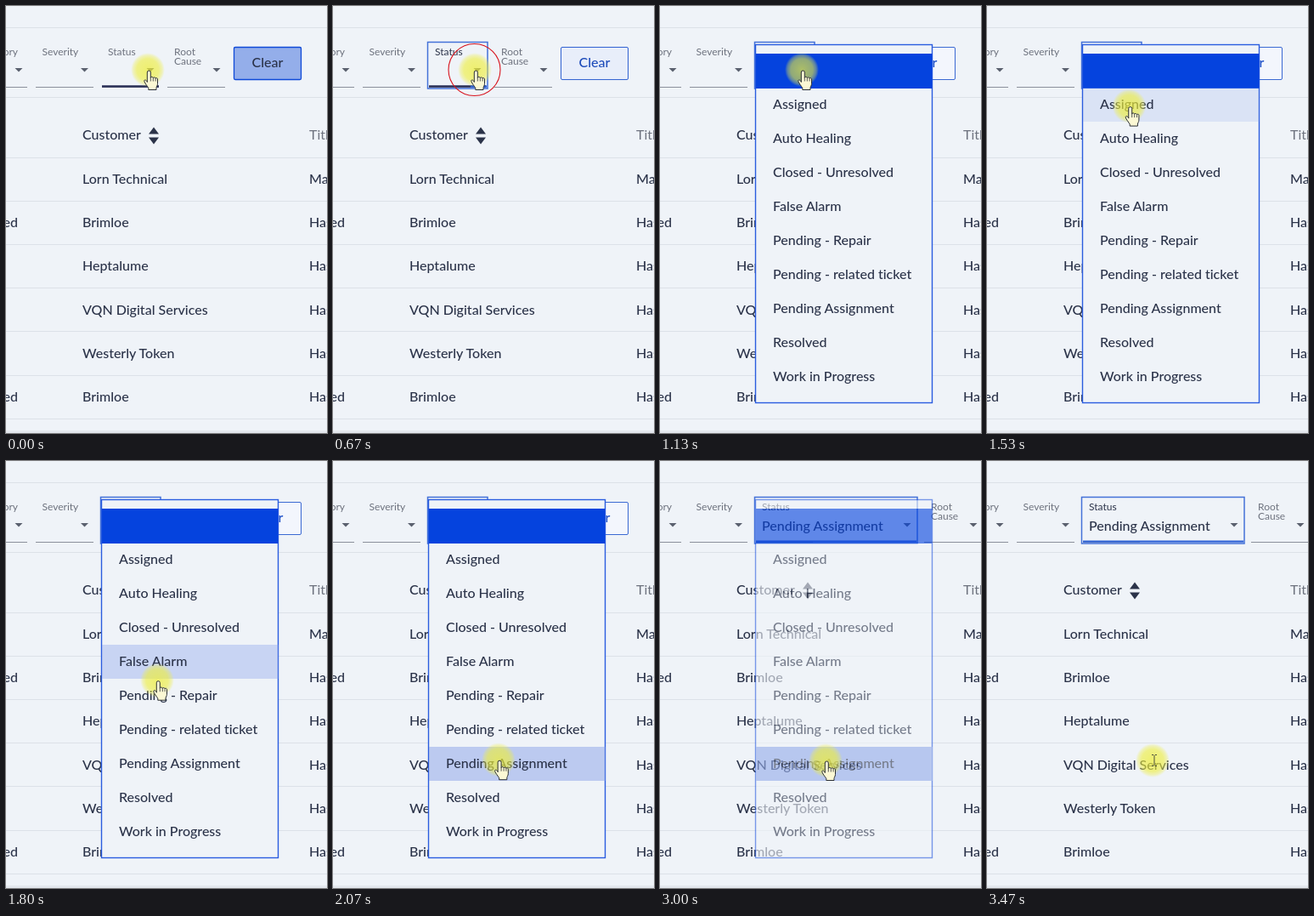
An HTML page for the animation above (3.99 s loop, 378x502 px).

```html
<!DOCTYPE html>
<html lang="en">
<head>
<meta charset="utf-8">
<title>Status filter</title>
<style>
  html, body { margin: 0; width: 100%; height: 100%; overflow: hidden; background: #eff3f8; }
  svg { display: block; width: 100%; height: 100%; }
  text {
    font: 500 16px Lato, "Open Sans", sans-serif; font-variant-ligatures: none;
    fill: #2b3349; white-space: pre;
  }
  .small { font-size: 12px; font-weight: 400; fill: #6d727e; }
  .rule { stroke: #dce1e8; }
  .under { stroke: #8b909b; }
  .arrow { fill: #5a606e; }
</style>
</head>
<body>
<svg viewBox="0 0 378 502">
  <defs>
    <radialGradient id="glow">
      <stop offset="0" stop-color="#eeee38" stop-opacity=".72"/>
      <stop offset=".65" stop-color="#eeee38" stop-opacity=".6"/>
      <stop offset=".85" stop-color="#eeee48" stop-opacity=".36"/>
      <stop offset="1" stop-color="#eeee50" stop-opacity="0"/>
    </radialGradient>
  </defs>
  <rect width="378" height="502" fill="#eff3f8"/>
  <rect y="499" width="378" height="3" fill="#e4e8ee"/>
  <g id="page"></g>

  <g id="status">
    <path class="under" d="M113 95.5H180"/>
    <rect id="focusBox" x="111.500" y="42.500" height="54.500" fill="none" stroke="#4472d8" stroke-width="1.500"/>
    <path id="hoverLine" d="M113 94.500H180" stroke="#2b3158" stroke-width="2.600"/>
    <path id="focusLine" stroke="#2f62d6" stroke-width="2.400"/>
    <text id="statusLabel" class="small" x="120" y="58">Status</text>
    <text id="value" x="120" y="82">Pending Assignment</text>
    <path id="statusArrow" class="arrow" d="M-4.5 -2h9l-4.5 4.5z"/>
  </g>

  <g id="cause">
    <text class="small" x="198" y="58">Root</text>
    <text class="small" x="198" y="69">Cause</text>
    <path class="arrow" d="M243.500 73h9l-4.500 4.500z"/>
    <path class="under" d="M190 95.500H258"/>
  </g>

  <g id="clear" text-anchor="middle">
    <rect x="268.500" y="48.500" width="79" height="38" rx="1.500" fill="#f3f6fd" stroke="#3a69d2"/>
    <text x="308" y="72" style="fill:#1c4fc8">Clear</text>
    <g id="clearFocus">
      <rect x="268.500" y="48.500" width="79" height="38" rx="1.500" fill="#94aeea" stroke="#0f4ad8" stroke-width="1.300"/>
      <text x="308" y="72">Clear</text>
    </g>
  </g>

  <g id="panel">
    <rect x="112.500" y="45.500" width="208" height="421" fill="#eff3f8" stroke="#2a5cdf" stroke-width="1.400"/>
    <rect x="113" y="56" width="207.500" height="41" fill="#0543de"/>
    <rect id="hover" x="113" width="207.500" height="40" fill="#95acea"/>
    <g id="options"></g>
  </g>

  <circle id="ring" fill="none" stroke="#d8141e" stroke-width="1.100"/>
  <g id="cursor">
    <circle r="20" fill="url(#glow)"/>
    <g id="hand" transform="translate(.8 1.500)" stroke="#2a2e34" stroke-linejoin="round">
      <path fill="#fbf8d4" d="M-1.500 13V1.500a2 2 0 0 1 4 0V8c0-1.600 3-1.600 3 .3 0-1.400 2.800-1.200 2.800.5 0-1.200 2.400-1 2.400.7V15c0 2-1.500 3.500-1.500 5V22H0V20C-1 18-5 13.500-5 11.700s2-1.700 3.500.8z"/>
      <path fill="none" stroke-width=".8" d="M2.500 8v4M5.500 8.500V12M8.300 9V12"/>
    </g>
    <path id="beam" fill="none" stroke="#4b4f3c" d="M-1 -6.500H1.200M2.800 -6.500H5M2 -6V6M-1 6.500H1.200M2.800 6.500H5"/>
  </g>
</svg>
<script>
const LOOP = 3990, TICK = 1000 / 15;
const $ = id => document.getElementById(id);
const clamp = v => Math.max(0, Math.min(1, v));
const show = (id, on) => $(id).setAttribute("visibility", on ? "visible" : "hidden");
const set = (id, attrs) => { for (const k in attrs) $(id).setAttribute(k, attrs[k]); };

const text = (x, y, s, extra = "") => `<text x="${x}" y="${y}" ${extra}>${s}</text>`;
const line = (x1, x2, y, cls) => `<path class="${cls}" d="M${x1} ${y}H${x2}"/>`;
const arrow = x => `<path class="arrow" d="M${x - 4.5} 73h9l-4.5 4.5z"/>`;

const customers = ["Lorn Technical", "Brimloe", "Heptalume", "VQN Digital Services", "Westerly Token", "Brimloe"];
const options = ["Assigned", "Auto Healing", "Closed - Unresolved", "False Alarm", "Pending - Repair",
  "Pending - related ticket", "Pending Assignment", "Resolved", "Work in Progress"];

function buildPage() {
  const small = 'class="small"';
  let s = line(0, 378, 25.5, "rule") + line(0, 378, 107.5, "rule");
  s += text(14, 58, "ory", small + ' text-anchor="end"') + arrow(15) + line(0, 25, 95.5, "under");
  s += text(42.5, 58, "Severity", small) + arrow(92.5) + line(35, 103, 95.5, "under");
  s += text(90, 157, "Customer") + text(357, 157, "Title", 'style="fill:#6d727e;font-weight:400"');
  s += '<path fill="#2b3349" d="M168 150.5l6-8 6 8zM168 154.500l6 8 6-8z"/>';
  for (let i = 0; i < 7; i++) s += line(0, 378, Math.floor(178 + 51.2 * i) + 0.5, "rule");
  customers.forEach((name, i) => {
    const y = Math.round(209 + 51.2 * i);
    s += text(90, y, name) + text(357, y, i ? "Hash" : "Main");
    if (i % 4 === 1) s += text(14, y, "ed", 'text-anchor="end"');
  });
  $("page").innerHTML = s;
  $("options").innerHTML = options.map((o, i) => text(133, 121 + 40 * i, o)).join("");
}

// Pointer travel from the select box down to the chosen option.
const MOVE = { start: 1350, span: 740, x: 167, y: 75, dx: 28, dy: 277 };
const ease = u => u * u * (3 - 2 * u);
const easeInverse = p => 0.5 - Math.sin(Math.asin(1 - 2 * p) / 3);
const rowTop = row => 56 + 40 * row;
const enterTime = row => MOVE.start + 40 + MOVE.span * easeInverse((rowTop(row) - MOVE.y) / MOVE.dy);

function drawHover(t) {
  let row = 7;
  while (row > 0 && enterTime(row) > t) row--;
  set("hover", { y: rowTop(row), opacity: row ? clamp((t - enterTime(row)) / 80) : 0 });
}

function drawRing(n, x, y) {
  const start = n < 30 ? 7 : 41, age = n - start;
  show("ring", age >= 1 && age <= 3);
  set("ring", { cx: x - 0.5, cy: y, r: Math.max(0, 10 * age + 0.5) });
}

function drawPanel(n) {
  const opening = clamp((n - 10) / 3), closing = clamp((n - 44) * 0.39);
  const scale = 0.8 + 0.2 * opening;
  set("panel", {
    opacity: n < 45 ? opening : 1 - closing,
    transform: `translate(0 ${45 * (1 - scale)}) scale(1 ${scale})`
  });
  show("panel", n > 10 && n < 47);
}

function drawFilters(n) {
  const focused = n >= 9, chosen = n >= 45, right = chosen ? 302 : 181;
  show("focusBox", focused);
  set("focusBox", { width: right - 110.5 });
  // The focus underline spreads out from the click point.
  const spread = clamp((n - 9) / 3) ** 2;
  show("hoverLine", n < 12);
  show("focusLine", focused);
  set("focusLine", { d: `M${168 - 55 * spread} 94.6H${right}` });
  $("statusLabel").style.fill = focused ? "#2b3349" : "#6d727e";
  show("value", chosen);
  set("statusArrow", { transform: `translate(${chosen ? 291 : 170} 75)` });
  set("cause", { transform: `translate(${chosen ? 121 : 0} 0)` });
  show("clear", !chosen);
  set("clearFocus", { opacity: n < 8 ? 1 : clamp(0.7 - 0.3 * (n - 8)) });
}

function draw(ms) {
  const n = Math.floor((ms + 5) / TICK), t = n * TICK;
  const p = ease(clamp((t - MOVE.start) / MOVE.span));
  const x = MOVE.x + MOVE.dx * Math.pow(p, 2.25), y = MOVE.y + MOVE.dy * p;
  drawFilters(n);
  drawPanel(n);
  drawHover(t);
  drawRing(n, x, y);
  set("cursor", { transform: `translate(${x} ${y})` });
  set("hand", { opacity: n < 47 ? 1 : 0 });
  set("beam", { opacity: n < 47 ? 0 : 1 });
}

function loop() {
  draw(performance.now() % LOOP);
  requestAnimationFrame(loop);
}

buildPage();
loop();
</script>
</body>
</html>
```
